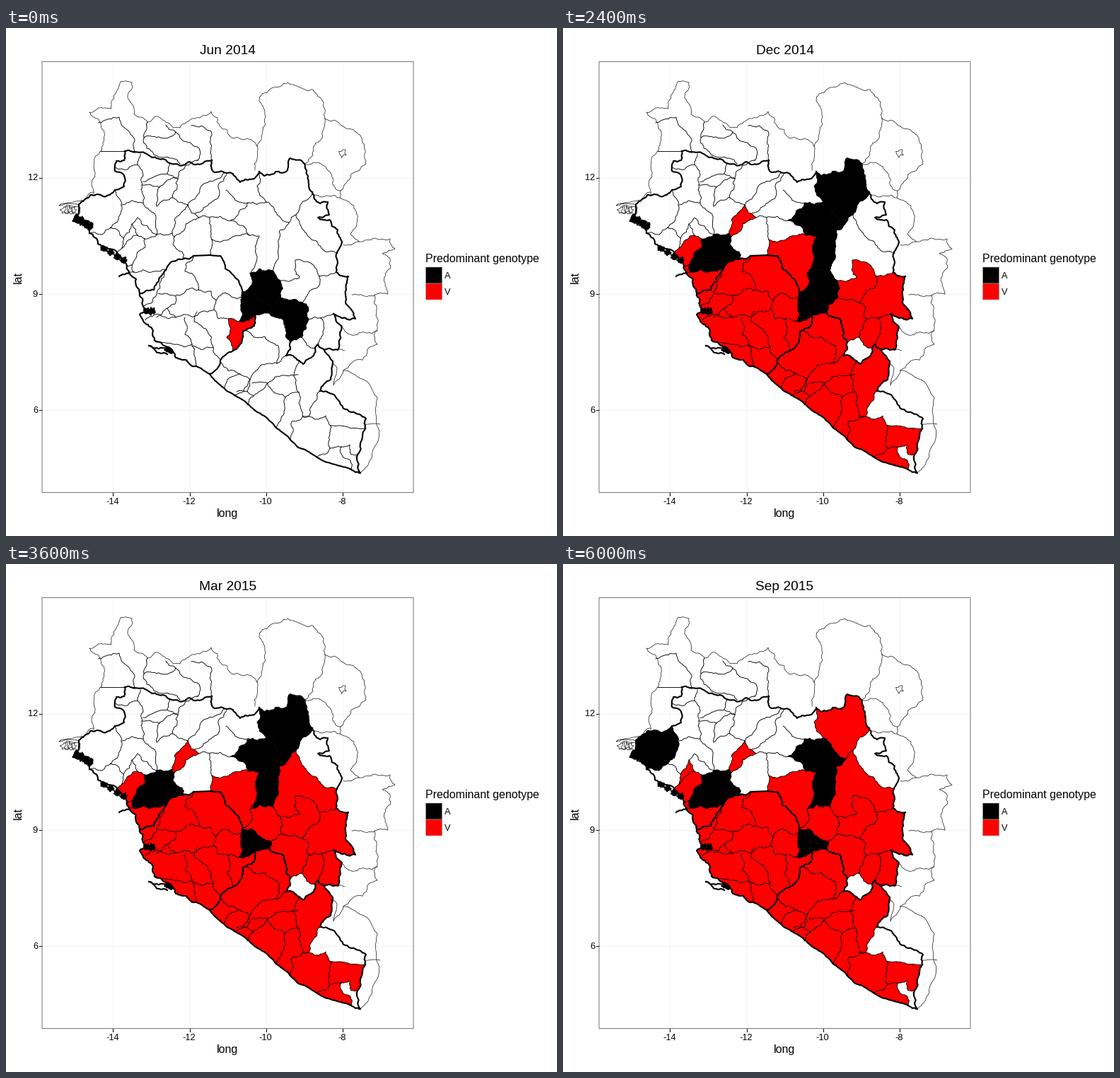
A matplotlib script for the animation above (7200 ms loop, 779 by 718 pixels).

```python
import numpy as np
import matplotlib.pyplot as plt
from matplotlib.animation import FuncAnimation
from matplotlib.patches import Polygon, Rectangle

W, H, DPI = 779, 718, 100
PX = 72 / DPI
BOLD, MID, FINE = 2.1, 0.9, 0.65
COLOR = {"A": "black", "V": "red", " ": "none"}
STEPS = 6

plt.rcParams["font.family"] = "Liberation Sans"
rng = np.random.default_rng(4)
fig = plt.figure(figsize=(W / DPI, H / DPI), dpi=DPI, facecolor="white")
ax = fig.add_axes([0, 0, 1, 1])
ax.set_xlim(0, W)
ax.set_ylim(H, 0)
ax.axis("off")
arcs = {}


def fractal(pts, amount):
    """Midpoint displacement: a ragged border through a few key points."""
    for _ in range(4):
        out = [pts[0]]
        for a, b in zip(pts, pts[1:]):
            d = b - a
            if np.hypot(*d) > 3.5:
                shift = np.array([-d[1], d[0]]) * rng.uniform(-1, 1) * amount
                out.append((a + b) / 2 + shift)
            out.append(b)
        pts = out
    return np.array(pts)


def line(w, *p, rough=0.17):
    pts = fractal(list(np.array(p, float).reshape(-1, 2)), rough)
    ax.plot(pts[:, 0], pts[:, 1], color="black", lw=w * PX, zorder=3, solid_joinstyle="round")
    return pts


def arc(name, *p, w=MID, rough=0.17):
    arcs[name] = line(w, *p, rough=rough)


def edge(name, *p, rough=0.17):
    arc(name, *p, w=BOLD, rough=rough)


def isles(x0, y0, x1, y1, n, size, w=BOLD, fill="black"):
    """Ragged islets scattered along a stretch of coast."""
    angle = np.linspace(0, 2 * np.pi, 14, endpoint=False)
    for u in np.linspace(0, 1, n):
        r = size * rng.uniform(0.4, 1.1, angle.size)
        x = x0 + u * (x1 - x0) + r * np.cos(angle)
        y = y0 + u * (y1 - y0) + r * np.sin(angle)
        ax.add_patch(Polygon(np.c_[x, y], fc=fill, ec="black", lw=w * PX, zorder=3))


def ring(names):
    """Join named borders end to end into one outline."""
    parts = [arcs[n] for n in names.split()]
    ends = parts[1][[0, -1]]

    def gap(p):
        return np.abs(ends - p).sum(axis=1).min()

    path = parts[0] if gap(parts[0][-1]) < gap(parts[0][0]) else parts[0][::-1]
    for p in parts[1:]:
        if np.abs(p[0] - path[-1]).sum() > np.abs(p[-1] - path[-1]).sum():
            p = p[::-1]
        path = np.vstack([path, p])
    return path


def text(x, y, s, size, **kw):
    kw = {"ha": "center", "va": "center_baseline", **kw}
    return ax.text(x, y - 0.8, s, fontsize=size * PX, zorder=6, **kw)


# panel, axes and legend
def rule(xs, ys, color, w):
    ax.plot(xs, ys, color=color, lw=w * PX, zorder=0)


for lon in range(-14, -7, 2):
    x = 151.5 + 54.1 * (lon + 14)
    rule([x, x], [48, 656], "#f0f0f0", 0.8)
    rule([x, x], [657, 661], "black", 1)
    text(x - 1, 669, str(lon), 12.8)
for lat in (12, 9, 6):
    y = 211.5 + 54.8 * (12 - lat)
    rule([52, 576], [y, y], "#f0f0f0", 0.8)
    rule([47, 51], [y, y], "black", 1)
    text(45, y, str(lat), 12.8, ha="right")
ax.add_patch(Rectangle((51, 47.5), 525, 609, fc="none", ec="#7f7f7f", lw=1.1 * PX, snap=False, zorder=4))
text(313, 686, "long", 16)
text(17, 353, "lat", 16, rotation=90, va="center")
text(593, 326, "Predominant genotype", 16, ha="left")
for row, k in enumerate("AV"):
    y = 338 + 23 * row
    ax.add_patch(Rectangle((593.5, y), 23, 23, fc=COLOR[k], ec="#999999", lw=0.6 * PX, snap=False))
    text(619.5, y + 12, k, 12.8, ha="left")
title = text(313.5, 31, "", 19.2)

# northern state: outer border
edge("boke_n", 95, 273, 103, 249, 119, 236, 154, 229)
line(BOLD, 154, 229, 167, 224, 165, 206, 154, 202, 156, 188, 167, 187, 168, 174)
line(BOLD, 168, 174, 199, 178, 231, 191, 259, 189, 291, 187)
line(BOLD, 291, 187, 293, 203, 321, 206, 331, 218, 358, 203)
edge("sig_n", 358, 203, 365, 209, 398, 201, 402, 184, 422, 192, 427, 209, 433, 232)
line(BOLD, 433, 232, 444, 248, 455, 246, 457, 264, 441, 268, 457, 271, 475, 303, 468, 318)
edge("kan_e", 468, 318, 467, 345)
edge("bey_e", 467, 345, 484, 351, 481, 370, 494, 411, 463, 404)
edge("lola_e", 463, 404, 474, 421, 469, 455, 450, 455)
edge("lola_s", 450, 455, 441, 447)
edge("nze_s", 441, 447, 437, 452)
edge("yom_s", 437, 452, 435, 463, 420, 475, 414, 470)
edge("yom_sw", 414, 470, 396, 463)
edge("yom_w", 396, 463, 402, 444)
edge("mac_s", 402, 444, 397, 430, 391, 411, 373, 403)
edge("gue_s", 373, 403, 352, 405)
edge("gue_kai", 352, 405, 331, 414)
edge("gue_w", 331, 414, 335, 403, 334, 381)
edge("gue_nw", 334, 381, 334, 374)
edge("far_s", 334, 374, 329, 357, 310, 340, 303, 322, 289, 321, rough=0.1)
edge("mam_s", 289, 321, 265, 322, rough=0)
edge("mam_sw", 265, 322, 251, 326)
edge("kin_s", 251, 326, 232, 332, 226, 342)
edge("for_s", 226, 342, 209, 370, 189, 375)

# northern state: coast
edge("boke_c", 95, 273, 107, 270, 118, 290)
line(BOLD, 118, 290, 130, 305, 157, 318)
edge("dub_c", 157, 318, 171, 336)
edge("coy_c", 171, 336, 174, 346)
edge("for_c", 174, 346, 184, 355, 189, 375)
line(BOLD, 160, 351, 174, 346)
isles(100, 270, 119, 280, 4, 6)
isles(139, 312, 166, 328, 4, 5)

# northern state: districts
arc("boke_e", 154, 229, 164, 254, 148, 282)
arc("boke_s", 148, 282, 136, 292, 118, 290)
line(MID, 148, 282, 166, 297)
arc("fri_w", 166, 297, 164, 311)
arc("dub_w", 164, 311, 157, 318)
arc("fri_s", 164, 311, 186, 293)
arc("fri_n", 166, 297, 178, 277, 186, 293)
arc("dub_n", 186, 293, 196, 298)
arc("dub_e", 196, 298, 197, 310, 178, 335)
arc("coy_n", 178, 335, 171, 336)
arc("coy_e", 178, 335, 181, 345)
arc("coy_s", 181, 345, 174, 346)
arc("for_n", 181, 345, 206, 345, 226, 342)
arc("kin_n", 196, 298, 213, 292, 235, 290)
arc("kin_ne", 235, 290, 238, 295)
arc("kin_e", 238, 295, 236, 306, 249, 316, 251, 326)
arc("dal_w", 235, 290, 238, 271, 257, 250)
arc("dal_e", 257, 250, 273, 268, 254, 277, 238, 295)
line(MID, 273, 268, 288, 268, 291, 299)
arc("far_w", 291, 299, 289, 321)
arc("far_n", 291, 299, 318, 297, 344, 293)
arc("kou_w", 344, 293, 338, 282, 318, 272)
line(MID, 288, 268, 318, 272)
arc("kou_n", 318, 272, 342, 247, 368, 246)
arc("sig_w", 358, 203, 355, 224, 368, 246)
arc("far_e", 344, 293, 358, 294, 355, 325, 345, 347)
arc("kis_n", 345, 347, 358, 340, 377, 343)
arc("kou_e", 377, 343, 385, 326, 387, 286, 400, 275)
arc("sig_s", 400, 275, 380, 259, 368, 246)
arc("sig_se", 400, 275, 410, 264)
arc("sig_e", 410, 264, 433, 232)
arc("kan_n", 410, 264, 428, 295, 468, 318)
arc("kis_w", 345, 347, 348, 362, 334, 374)
arc("kis_ne", 377, 343, 386, 356)
arc("kis_e", 386, 356, 388, 382)
arc("kis_se", 388, 382, 375, 392)
arc("kis_s", 334, 374, 347, 374, 356, 383, 375, 392)
arc("gue_e", 375, 392, 373, 403)
arc("ker_n", 386, 356, 415, 353, 409, 328, 433, 334, 443, 351)
arc("kan_s", 443, 351, 467, 345)
arc("ker_e", 443, 351, 440, 367, 419, 388)
arc("mac_n", 419, 388, 388, 382)
arc("mac_e", 419, 388, 428, 395, 428, 412)
arc("nze_n", 428, 412, 445, 410)
arc("lola_n", 445, 410, 463, 404)
arc("lola_w", 445, 410, 441, 447)
arc("nze_w", 428, 412, 418, 437)
arc("mac_se", 418, 437, 402, 444)
arc("nze_sw", 418, 437, 425, 448, 437, 452)
line(MID, 190, 178, 186, 193, 155, 197)
line(MID, 186, 193, 192, 222, 194, 247)
line(MID, 164, 250, 194, 247, 212, 268, 213, 292)
line(MID, 194, 217, 228, 206, 231, 191)
line(MID, 228, 206, 243, 213, 272, 187)
line(MID, 192, 222, 217, 225, 213, 252, 236, 240, 257, 250)
line(MID, 243, 213, 236, 240)
line(MID, 217, 225, 243, 213)
line(MID, 257, 250, 275, 225, 308, 205)
line(MID, 267, 262, 300, 240, 312, 207)
line(MID, 311, 229, 342, 247)
line(MID, 178, 277, 186, 268, 213, 292)

# western state
edge("sl_c", 189, 375, 194, 394, 206, 401, 189, 405, 208, 428, 210, 441)
edge("bon_c", 210, 441, 235, 456, 240, 466, 269, 478)
edge("puj_c", 269, 478, 288, 489, rough=0.06)
line(BOLD, 202, 449, 230, 452)
line(BOLD, 202, 449, 228, 461)
isles(200, 400, 206, 400, 2, 5)
isles(228, 455, 233, 457, 2, 4)
arc("koi_w", 265, 322, 254, 334, 253, 344, 265, 349, 272, 370)
arc("koi_s", 272, 370, 290, 372, 297, 385, 306, 375, 334, 381)
arc("kai_n", 331, 414, 315, 411)
arc("kai_w", 315, 411, 312, 437, 321, 456)
edge("sl_lib", 288, 489, 303, 470, 321, 456)
edge("kai_se", 321, 456, 334, 439, 336, 428)
edge("kai_e", 336, 428, 351, 421, 352, 405)
arc("bon_n", 210, 441, 240, 447, 263, 447)
arc("bon_e", 263, 447, 269, 478)
line(MID, 194, 394, 213, 377, 226, 342)
line(MID, 215, 375, 240, 379, 239, 390, 213, 409)
line(MID, 240, 378, 272, 370)
line(MID, 228, 396, 240, 409, 262, 408, 294, 398, 297, 385)
line(MID, 197, 413, 240, 409)
line(MID, 253, 409, 253, 433, 263, 447)
line(MID, 270, 401, 266, 415, 283, 425, 293, 451, 303, 470)
line(MID, 263, 450, 293, 451)
line(MID, 294, 398, 300, 411, 315, 411)

# southern state
edge("lib_c1", 288, 489, 323, 519, rough=0.06)
edge("lib_c2", 323, 519, 358, 544, 382, 565, rough=0.06)
edge("lib_c3", 382, 565, 412, 592, 445, 610, 488, 624, rough=0.06)
line(BOLD, 488, 624, 501, 629, 497, 603)
edge("gee_e", 497, 603, 504, 577, 508, 566)
line(BOLD, 508, 566, 509, 552, 488, 543, 470, 526, 444, 513)
edge("nim_e", 444, 513, 459, 497, 462, 471, 450, 455)
arc("lof_s", 336, 428, 350, 437, 366, 436, 385, 449, 383, 474)
arc("bong_w", 383, 474, 357, 481, 345, 497)
arc("mon_w", 345, 497, 338, 508, 323, 519)
arc("bas_e", 382, 565, 395, 522, 414, 515)
arc("nim_s", 414, 515, 414, 530, 420, 549)
arc("nim_se", 420, 549, 428, 549, 430, 537, 444, 513)
arc("sin_n", 420, 549, 437, 553, 452, 548, 459, 562)
arc("gee_w", 459, 562, 458, 594)
arc("gee_sw", 458, 594, 474, 592)
arc("kru_e", 474, 592, 473, 600, 487, 611, 488, 624)
arc("gee_s", 474, 592, 486, 589, 488, 603, 497, 603)
arc("gee_n", 459, 562, 508, 566, rough=0.08)
line(MID, 383, 474, 396, 463)
line(MID, 414, 470, 414, 515)
line(MID, 303, 470, 331, 489, 345, 497)
line(MID, 309, 508, 316, 494, 331, 489)
line(MID, 345, 497, 341, 514, 350, 520, 341, 533)
line(MID, 326, 514, 341, 514)
line(MID, 348, 502, 370, 502, 380, 493, 413, 490)
line(MID, 350, 520, 370, 502, 395, 522)
line(MID, 401, 582, 404, 556, 420, 549)
line(MID, 458, 594, 440, 606)

# neighbouring states
line(FINE, 124, 235, 126, 210, 134, 174)
line(MID, 134, 174, 168, 174, rough=0)
line(FINE, 134, 174, 131, 129, 118, 119, 149, 114, 162, 76, 178, 77, 172, 99, 181, 122, 200, 133)
line(FINE, 200, 133, 211, 125, 246, 141, 290, 118, 319, 155, 355, 167)
line(FINE, 355, 167, 367, 125, 358, 98, 405, 80, 434, 87, 451, 128)
line(FINE, 355, 167, 352, 201)
line(FINE, 451, 128, 474, 138, 504, 161, 509, 192, 473, 230, 472, 240, 494, 258, 487, 291, 499, 302)
line(FINE, 499, 302, 543, 298, 550, 312, 532, 319, 543, 326, 540, 376, 521, 378)
line(FINE, 521, 378, 526, 415, 525, 447, 477, 484)
line(FINE, 477, 484, 512, 501, 525, 523, 527, 580, 501, 629, rough=0.09)
line(FINE, 451, 128, 447, 155, 422, 192)
line(FINE, 422, 192, 447, 193, 466, 228, 473, 230)
line(FINE, 437, 236, 472, 240)
line(FINE, 477, 306, 499, 302)
line(FINE, 489, 377, 521, 378)
line(FINE, 475, 421, 493, 434, 525, 428)
line(FINE, 469, 455, 479, 456)
line(FINE, 462, 471, 463, 505, 477, 484)
line(FINE, 508, 560, 529, 560, rough=0.05)
isles(476, 177, 476, 177, 1, 6, FINE, "none")
line(MID, 131, 134, 160, 126, 174, 146, 182, 177)
line(MID, 200, 133, 195, 155, 199, 170, 222, 183, 246, 192)
line(MID, 195, 155, 231, 154, 240, 147, 273, 170, 270, 187)
line(MID, 226, 137, 240, 147)
line(MID, 262, 138, 290, 146, 291, 187)
line(FINE, 124, 232, 95, 246, 75, 251, 103, 250)
isles(83, 257, 99, 257, 4, 7, FINE, "none")

# one letter per step: A, V or blank
REGIONS = [
    ("AAAAAA", "gue_s gue_kai gue_w gue_nw kis_s gue_e"),
    ("AAAVVV", "kis_n kis_ne kis_e kis_se kis_s kis_w"),
    ("AVVVVV", "mac_s gue_e kis_se mac_n mac_e nze_w mac_se"),
    ("VVVVVV", "gue_kai kai_n kai_w kai_se kai_e"),
    (" AAAVV", "sig_n sig_e sig_se sig_s sig_w"),
    (" AAAAA", "kou_n sig_s kou_e kis_n far_e kou_w"),
    (" VVVVV", "dub_c dub_w fri_s dub_n dub_e coy_n"),
    (" VVVVV", "coy_c coy_n coy_e coy_s"),
    (" VVVVV", "mam_sw kin_s for_s sl_c bon_n bon_e puj_c sl_lib kai_w kai_n gue_w koi_s koi_w"),
    (" VVVVV", "ker_n ker_e mac_n kis_e"),
    (" VVVVV", "nze_n lola_w nze_s nze_sw nze_w"),
    (" VVVVV", "kai_e gue_s mac_s yom_w yom_sw yom_s nze_s lola_s nim_e nim_se nim_s bas_e"
               " lib_c2 mon_w bong_w lof_s"),
    (" VVVVV", "gee_n gee_e gee_s gee_sw gee_w"),
    ("  AAAA", "kin_n kin_ne kin_e kin_s for_n coy_e dub_e"),
    ("  VVVV", "for_n for_s for_c coy_s"),
    ("  VVVV", "dal_w dal_e kin_ne"),
    ("  VVVV", "far_n far_e kis_w far_s far_w"),
    ("  VVVV", "far_s mam_s koi_w koi_s gue_nw"),
    ("  VVVV", "bon_c bon_n bon_e"),
    ("  VVVV", "bey_e kan_s ker_e mac_e nze_n lola_n"),
    ("  VVVV", "lola_n lola_e lola_s lola_w"),
    ("  VVVV", "sl_lib kai_se lof_s bong_w mon_w lib_c1"),
    ("  VVVV", "bas_e nim_s sin_n gee_w gee_sw kru_e lib_c3"),
    ("   VVV", "kan_n kan_e kan_s ker_n kis_ne kou_e sig_se"),
    ("    AA", "boke_n boke_e boke_s boke_c"),
    ("    VV", "fri_w fri_s fri_n"),
]
areas = [(steps, ax.add_patch(Polygon(ring(names), fc="none", ec="none", zorder=2)))
         for steps, names in REGIONS]


def draw(i):
    year, quarter = divmod(i + 1, 4)
    title.set_text(f"{('Mar', 'Jun', 'Sep', 'Dec')[quarter]} {2014 + year}")
    for steps, patch in areas:
        patch.set_facecolor(COLOR[steps[i]])
    return [title] + [patch for _, patch in areas]


anim = FuncAnimation(fig, draw, frames=STEPS, interval=1200, repeat=True)
plt.show()
```
